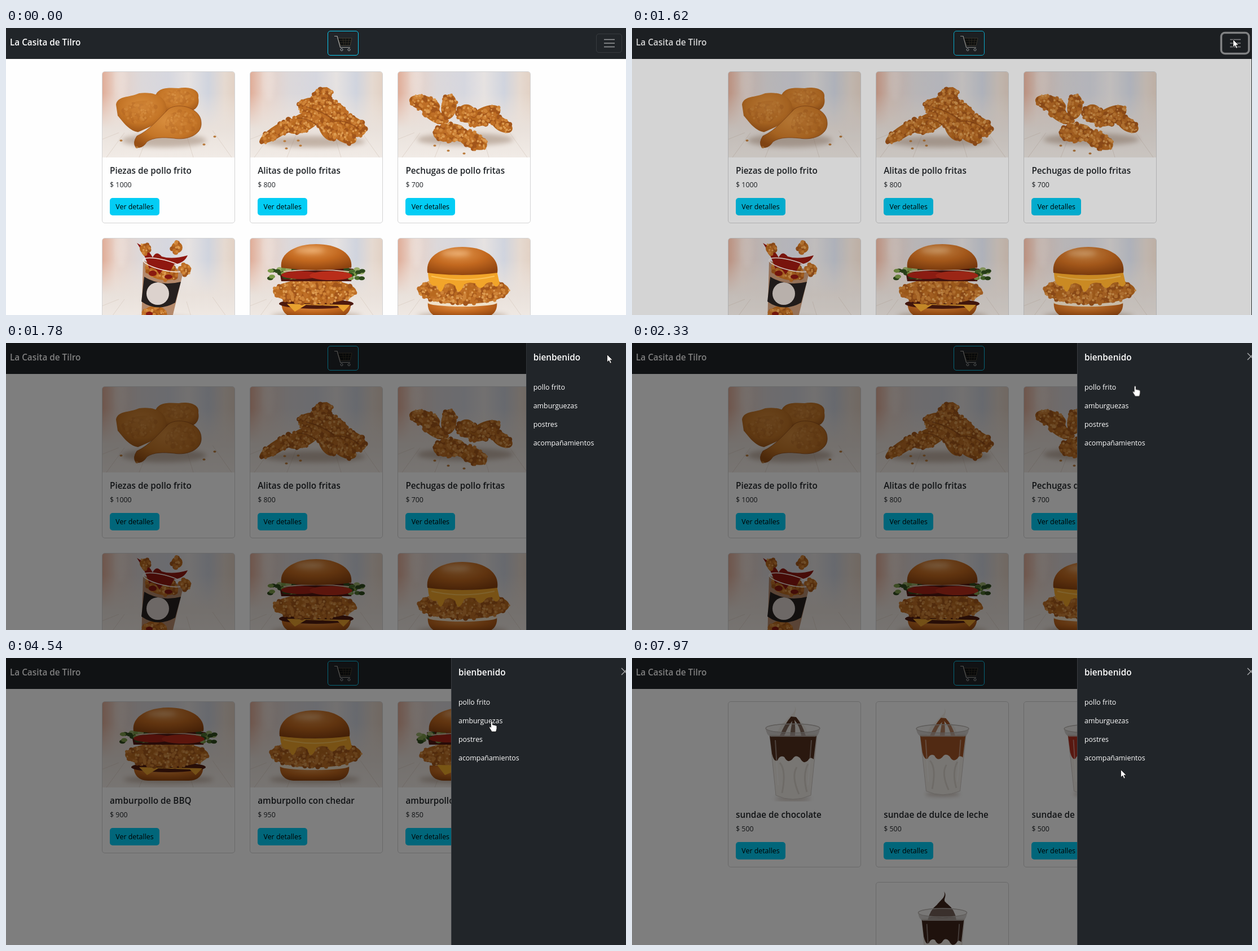
Write an HTML page that moves like this. It is 1099 by 510 pixels and loops after 8 s.

```html
<!DOCTYPE html>
<html lang="es">
<head>
<meta charset="utf-8">
<title>La Casita de Tilro</title>
<style>
html, body { margin: 0; width: 100%; height: 100%; overflow: hidden; background: #fefefe; }
body { position: relative; font: 12.4px/20px "Open Sans", "Noto Sans", sans-serif; color: #212529; }
body * { box-sizing: border-box; }
div, svg, span { position: absolute; white-space: nowrap; }
.layer { inset: 0; }

.nav { left: 0; top: 0; width: 100%; height: 55px; background: #212529; }
.h { font-size: 15.3px; font-weight: 600; }
.nav .h { left: 7px; top: 15px; color: #fff; }
.cart { left: 570px; top: 5px; width: 55px; height: 44px; border: 1px solid #0dcaf0; border-radius: 5px; }
.burger { left: 1046px; top: 10px; width: 46px; height: 34px; border: 1px solid rgba(255,255,255,.1); border-radius: 5px; }
.ring { inset: -1px; border-radius: 5px; box-shadow: 0 0 0 3.3px rgba(255,255,255,.55); }

.card { width: 236px; height: 270px; border: 1px solid #d3d3d4; border-radius: 5px; background: #fefefe; overflow: hidden; }
.card svg { left: 0; top: 0; width: 234px; height: 152px; }
.card .info { left: 13px; top: 152px; }
.info .h { top: 13px; }
.info .price { top: 39px; }
.info .btn { top: 72px; width: 88px; height: 31px; line-height: 31px; text-align: center; background: #03cdf5; border-radius: 5px; color: #000; }
.tall { height: 294.6px; }
.tall svg { height: 177px; }
.tall .info { top: 176.6px; }

.dim { inset: 0; background: #000; }
.panel { left: 789px; top: 0; width: 328px; height: 100%; background: #212529; border-left: 1px solid #3a3e42; color: #fff; }
.panel span { left: 12px; }
.cur { left: 0; top: 0; width: 0; height: 0; }
.cur svg { overflow: visible; width: 1px; height: 1px; left: 0; top: 0; }
.click { left: -10px; top: -10px; width: 20px; height: 20px; border-radius: 50%; background: rgba(255,255,0,.47); }

.rows1, .rowA, .rowB, .rows2, .rows3, .ring, .cur, .hand, .arrow, .click { animation: 8s step-end infinite; }
.rows1 { animation-name: rows1; }
.rowA { animation-name: rowA; }
.rowB { animation-name: rowB; }
.rows2 { animation-name: rows2; }
.rows3 { animation-name: rows3; }
.ring { animation-name: ring; }
.hand { animation-name: hand; }
.arrow { animation-name: arrow; }
.click { animation-name: click; }
.cur { animation: cur 8s linear infinite; }
.dim { animation: dim 8s linear infinite; }
.panel { animation: panel 8s linear infinite; }

@keyframes rows1 { 0% { visibility: visible } 56.7%, to { visibility: hidden } }
@keyframes rowA { 0% { visibility: visible } 39.95%, to { visibility: hidden } }
@keyframes rowB { 0% { visibility: hidden } 39.95% { visibility: visible } 56.7%, to { visibility: hidden } }
@keyframes rows2 { 0% { visibility: hidden } 56.7% { visibility: visible } 92.7%, to { visibility: hidden } }
@keyframes rows3 { 0% { visibility: hidden } 92.7%, to { visibility: visible } }
@keyframes ring { 0% { visibility: hidden } 18.75%, to { visibility: visible } }
@keyframes hand {
  0% { visibility: hidden } 13.5% { visibility: visible } 19.4% { visibility: hidden }
  27.7% { visibility: visible } 97.6%, to { visibility: hidden }
}
@keyframes arrow {
  0% { visibility: hidden } 3.25% { visibility: visible } 13.5% { visibility: hidden }
  19.4% { visibility: visible } 27.7% { visibility: hidden } 97.6%, to { visibility: visible }
}
@keyframes click {
  0% { visibility: hidden }
  18.75% { visibility: visible } 19.6% { visibility: hidden }
  35.875% { visibility: visible } 37.5% { visibility: hidden }
  51.75% { visibility: visible } 53.5% { visibility: hidden }
  88.625% { visibility: visible } 90.25%, to { visibility: hidden }
}
@keyframes cur {
  0%, 3.25% { transform: translate(1050px, 471px); animation-timing-function: cubic-bezier(.3,.3,.5,1) }
  12.6%, 24% { transform: translate(1065px, 20px); animation-timing-function: cubic-bezier(.4,.2,.7,.9) }
  28.25% { transform: translate(905px, 74px); animation-timing-function: ease-out }
  33.4%, 41.8% { transform: translate(855.5px, 80.5px) }
  46.75% { transform: translate(862px, 110.5px) }
  48.5%, 57% { transform: translate(861px, 112px) }
  57.6%, 59.4% { transform: translate(862px, 112px) }
  61.5% { transform: translate(864px, 116px) }
  69.4%, 73% { transform: translate(832px, 145px) }
  73.6%, 94.4% { transform: translate(830.5px, 146px) }
  97.9%, 99.4% { transform: translate(866px, 197px) }
  99.6%, to { transform: translate(866px, 198px) }
}
@keyframes dim { 0%, 19.28% { opacity: 0 } 22.25%, to { opacity: .5 } }
@keyframes panel {
  0%, 19.4% { transform: translateX(328px); animation-timing-function: ease-in-out }
  24.55%, to { transform: none }
}
</style>
</head>
<body>
<svg width="0" height="0">
  <defs id="art">
    <linearGradient id="wall">
      <stop offset="0" stop-color="#dfab96"/><stop offset=".1" stop-color="#e8d0c5"/>
      <stop offset=".3" stop-color="#dcd8da"/><stop offset=".5" stop-color="#d6d7df"/>
      <stop offset=".65" stop-color="#e6e2e1"/><stop offset=".8" stop-color="#d0d4de"/>
      <stop offset=".92" stop-color="#e5d9d0"/><stop offset="1" stop-color="#e2d1c4"/>
    </linearGradient>
    <linearGradient id="table" x2="0" y2="1">
      <stop offset=".25" stop-color="#efe6df" stop-opacity="0"/>
      <stop offset=".66" stop-color="#e9e1db"/><stop offset="1" stop-color="#f1ebe6"/>
    </linearGradient>
    <radialGradient id="bun" cx=".45" cy=".25" r=".8">
      <stop offset="0" stop-color="#e0934a"/><stop offset=".5" stop-color="#c2681f"/><stop offset="1" stop-color="#8c420f"/>
    </radialGradient>
    <radialGradient id="fried" cx=".5" cy=".35" r=".7">
      <stop offset="0" stop-color="#d98f3f"/><stop offset=".6" stop-color="#c47527"/><stop offset="1" stop-color="#985015"/>
    </radialGradient>
    <filter id="soft" x="-30%" y="-80%" width="160%" height="260%"><feGaussianBlur stdDeviation="4"/></filter>
  </defs>
</svg>

<div class="layer" id="page"></div>
<div class="nav">
  <span class="h">La Casita de Tilro</span>
  <div class="cart">
    <svg width="52" height="42" fill="none">
      <path d="M17 12h25l-3 13H22z" fill="#0d0f10" stroke="#4a4438"/>
      <path d="M20 16h21M21 20h19M26 12l2 13M31 12v13M37 12l-2 13" stroke="#3a3529" stroke-width=".8"/>
      <path d="M11 8.500h5l5.500 20H39" stroke="#a5a5a2" stroke-width="1.200"/>
      <g fill="#181a1b" stroke="#aeb4b8"><circle cx="24" cy="32.500" r="2"/><circle cx="37" cy="32.500" r="2"/></g>
    </svg>
  </div>
  <div class="burger">
    <div class="ring"></div>
    <svg width="44" height="32"><path d="M13 9.500h19M13 16h19M13 22.500h19" stroke="#9b9d9f" stroke-width="1.600"/></svg>
  </div>
</div>
<div class="dim"></div>
<div class="panel">
  <span class="h" style="top:15px">bienbenido</span>
  <span style="top:69px">pollo frito</span>
  <span style="top:102px">amburguezas</span>
  <span style="top:135px">postres</span>
  <span style="top:168px">acompañamientos</span>
  <svg style="left:300px;top:17px" width="14" height="14"><path d="M1 1l12 12M13 1L1 13" stroke="#a3a5a7" stroke-width="1.500"/></svg>
</div>
<div class="cur">
  <div class="click"></div>
  <svg class="arrow"><path d="M.5.5v13.500l3.200-2.900 2.300 5.100 2.300-1-2.300-5h4.200z" fill="#fff" stroke="#111" stroke-width=".8"/></svg>
  <svg class="hand"><path d="M-1.500 1.500q1.500-2 3 0v5.500q1.500-1 2.500.4 1.500-.8 2.500.6 2-.6 2.500 1.200v4.300q-.5 2.500-1.500 5.500h-7.500q-1.200-2.700-3.700-6.200-1.200-2.300.4-2.700 1-.1 1.800 1.300z" fill="#fff" stroke="#111" stroke-width=".8"/></svg>
</div>

<script>
let seed = 7;
const rnd = () => (seed = seed * 16807 % 2147483647) / 2147483647;
const $ = id => document.getElementById(id);
const tones = ['#a3561b', '#bf6f27', '#cf8438', '#dd9c52'];

// Crunchy coating: dark large lumps first, small light ones on top
function crisp(cx, cy, rx, ry, rot = 0) {
  const n = rx * ry / 8;
  let s = `<g transform="translate(${cx} ${cy}) rotate(${rot})"><ellipse rx="${rx * .9}" ry="${ry * .9}" fill="#b8691f"/>`;
  for (let i = 0; i < n; i++) {
    const k = i / n, a = rnd() * 6.283, d = Math.sqrt(rnd()) * .9;
    const x = Math.cos(a) * d * rx, y = Math.sin(a) * d * ry;
    s += `<circle cx="${x.toFixed(1)}" cy="${y.toFixed(1)}" r="${(.9 + (1 - k) * 3.2 + rnd()).toFixed(1)}" fill="${tones[k * 4 | 0]}"/>`;
  }
  return s + '</g>';
}
const path = (d, fill, more = '') => `<path d="${d}" fill="${fill}" ${more}/>`;
const oval = (x, y, rx, ry, fill, more = '') => `<ellipse cx="${x}" cy="${y}" rx="${rx}" ry="${ry}" fill="${fill}" ${more}/>`;
const shadow = (x, y, rx, ry) => oval(x, y, rx, ry, '#8f7460', 'opacity=".45" filter="url(#soft)"');
const crumb = (x, y) => oval(x, y, 2.6, 1.8, '#b87838');

const scene = '<rect width="236" height="152" fill="url(#wall)"/>' +
  oval(34, 16, 10, 36, '#f2e9e4', 'opacity=".4" filter="url(#soft)"') +
  '<rect width="236" height="152" fill="url(#table)"/>' +
  '<path d="M40 108L8 152M82 112L66 152M150 112l12 40M196 104l34 48M0 120l30-12" stroke="#d8cbc1" opacity=".7" fill="none"/>';

const pieces = shadow(110, 122, 75, 12) +
  path('M95 42C100 27 120 28 136 29C152 26 174 30 171 46C174 62 164 70 150 72L104 74Z', 'url(#fried)') +
  path('M25 58C28 42 48 46 66 38C90 34 116 44 114 66C110 90 84 98 64 107C46 104 36 86 28 78Z', 'url(#fried)') +
  path('M118 66C138 52 176 66 176 90C178 112 150 122 128 118C108 116 92 116 80 124Q72 137 60 134Q54 126 62 114C84 104 100 84 118 66Z', 'url(#fried)', 'stroke="#8d4a18" stroke-width=".8"') +
  '<g opacity=".3">' + crisp(66, 70, 34, 20, -15) + crisp(140, 90, 30, 22) + crisp(136, 46, 30, 13) + '</g>' +
  crumb(34, 122) + crumb(62, 134) + crumb(181, 129) + crumb(200, 115);

const wings = shadow(115, 124, 90, 10) + crisp(128, 42, 21, 15, -25) + crisp(130, 68, 50, 24, 12) +
  crisp(95, 90, 36, 18, -25) + crisp(50, 105, 42, 12, -32) + crisp(178, 96, 33, 20, 20) +
  crisp(168, 114, 25, 13, 25) + crisp(138, 100, 16, 27, -28) +
  path('M100 62q30 8 50 24M84 82q26 0 44 22M150 88q22-4 44 14', 'none', 'stroke="#8f4714" stroke-width="2" opacity=".7"') +
  crumb(62, 123) + crumb(65, 136) + crumb(86, 122) + crumb(90, 131);

const strips = shadow(120, 120, 85, 11) + crisp(48, 56, 31, 15, 15) + crisp(66, 78, 28, 12, 30) +
  crisp(91, 62, 15, 25, 8) + crisp(122, 74, 18, 18) + crisp(154, 78, 34, 17, -25) +
  crisp(185, 94, 23, 13, 30) + crisp(92, 108, 32, 18, -5) + crisp(132, 121, 32, 16, 25) +
  crumb(90, 140) + crumb(118, 145) + crumb(66, 131);

const loaf = (x, y, h) =>
  path(`M${x - 62} ${y + h}C${x - 66} ${y + 16} ${x - 36} ${y} ${x} ${y}S${x + 66} ${y + 16} ${x + 62} ${y + h}Q${x} ${y + h + 8} ${x - 62} ${y + h}Z`, 'url(#bun)') +
  oval(x - 12, y + 11, 26, 5, '#f3c595', 'opacity=".55" filter="url(#soft)"');
const base = x => shadow(x, 138, 80, 7) +
  path(`M${x - 61} 113H${x + 61}C${x + 63} 128 ${x + 54} 140 ${x + 36} 140H${x - 36}C${x - 54} 140 ${x - 63} 128 ${x - 61} 113Z`, 'url(#bun)');

function leaves(x) {
  let s = '';
  for (let i = 0; i < 44; i++) {
    const side = i % 2 ? 1 : -1, d = 36 + rnd() * 46;
    s += oval((x + side * d).toFixed(1), (54 + rnd() * 17).toFixed(1), 5.5, 3.5, ['#4c6e2c', '#7b9a48', '#2f4a1c', '#9aad6a'][rnd() * 4 | 0]);
  }
  return s;
}
const salad = x => path(`M${x - 66} 54Q${x} 44 ${x + 66} 54L${x + 62} 76H${x - 62}Z`, '#4f1710') + leaves(x) +
  oval(x - 28, 65, 34, 7, '#a62216') + oval(x + 26, 66, 38, 8, '#b92d1a') +
  path(`M${x - 58} 59Q${x} 52 ${x + 58} 59`, 'none', 'stroke="#d9b9a8" stroke-width="2"');
const bbq = base(118) + oval(118, 116, 66, 9, '#4e1a0e') + path('M66 116l14 14 20-12 56 2 10 10 12-12z', '#e9a22f') +
  crisp(115, 94, 82, 24) + salad(118) + loaf(118, 10, 42);
const classic = base(118) + crisp(115, 94, 82, 24) + path('M70 112l14 18 34-14 30 12 20-14z', '#f2ac28') + salad(118) + loaf(118, 10, 42);
const cheddar = base(115) + oval(115, 114, 62, 7, '#efe0c8') + crisp(117, 92, 90, 27) +
  path('M54 58Q115 72 176 58L181 80Q174 92 168 78Q158 76 152 86Q144 92 138 80Q126 76 118 82Q108 106 102 84Q92 76 84 82Q76 106 70 84Q54 88 54 58Z', '#f2a52a') +
  path('M60 67Q115 80 172 67', 'none', 'stroke="#fcc35a" stroke-width="2"') + loaf(115, 15, 46);

const snack = shadow(112, 146, 50, 7) +
  path('M73 40L145 56L122 152H70Z', '#a8744f', 'opacity=".8"') +
  crisp(106, 58, 33, 17, 12) + crisp(94, 136, 24, 18) +
  path('M62 8Q84 20 90 34Q96 20 106 32Q124 38 152 30Q146 44 128 46L120 60Q110 50 102 64Q92 46 84 54Q78 32 62 8Z', '#8f1810') +
  oval(90, 62, 7, 5, '#8a1a10') + oval(118, 68, 7, 4, '#861811') + oval(84, 134, 6, 4, '#8a1a10') + oval(106, 142, 7, 4, '#8a1a10') +
  '<ellipse cx="109" cy="47" rx="37" ry="9" transform="rotate(14 109 47)" fill="none" stroke="#f3ebe6" stroke-width="1.500"/>' +
  path('M75 68Q104 86 140 77L130 114Q98 132 70 112Z', '#26201f') +
  '<circle cx="99" cy="98" r="20" fill="#dcd2cd"/>' +
  crisp(133, 16, 11, 11) + crisp(76, 18, 10, 10) + crisp(148, 55, 11, 11);

function sundae(sauce, move, cover) {
  const swirl = 'M118 7C126 18 112 22 124 30Q140 42 142 60H86Q90 42 104 32C112 22 122 18 118 7Z';
  return `<g transform="${move}">` + shadow(115, 172, 32, 4) +
    path('M74 58H158L147 166Q115 180 85 166Z', '#f1ede8', 'stroke="#cfc9c4"') +
    path('M74 60H157L152 102Q146 96 142 104Q134 112 128 100Q120 92 114 102Q106 110 100 98Q92 94 88 104Q82 108 78 92Z', sauce) +
    path('M92 108Q104 122 96 162M122 116Q112 132 126 164M142 110Q132 130 140 160', 'none', 'stroke="#ddd7d0" stroke-width="3"') +
    path(swirl, cover ? sauce : '#f4f0ea') +
    path('M112 26Q100 40 92 60H100Q106 44 114 34Q112 46 110 60H119Q120 44 118 32Q128 44 130 60H138Q132 40 121 27Z', sauce) +
    oval(115, 47, 48, 8, '#d6d0cb', 'opacity=".35"') +
    '<ellipse cx="115" cy="47" rx="48" ry="8" fill="none" stroke="#bcb7b3" stroke-width="1.500"/>' +
    path('M67 47Q68 59 76 62H155Q162 59 163 47Q150 56 115 56T67 47Z', '#c9c3bf', 'opacity=".75"') +
    path('M84 68l5 80M148 68l-6 80', 'none', 'stroke="#fff" stroke-width="2" opacity=".4"') + '</g>';
}

const symbol = (id, h, body) => `<symbol id="${id}" viewBox="1 0 234 ${h}">${body}</symbol>`;
$('art').innerHTML += Object.entries({ pieces, wings, strips, snack, bbq, cheddar, classic })
  .map(([id, body]) => symbol(id, 152, scene + body)).join('') +
  symbol('choco', 177, sundae('#54301f', '')) +
  symbol('dulce', 177, sundae('#a35427', 'translate(7 4) scale(.97 .93)')) +
  symbol('berry', 177, sundae('#b23120', 'translate(7 4) scale(.97 .93)')) +
  symbol('dark', 177, sundae('#3f241a', 'translate(15 9) scale(.9 .95)', true));

const card = (col, top, art, name, price, cls = '') =>
  `<div class="card ${cls}" style="left:${170 + col * 262.2}px;top:${top}px"><svg><use href="#${art}"/></svg>
  <div class="info"><span class="h">${name}</span><span class="price">$ ${price}</span><span class="btn">Ver detalles</span></div></div>`;
const group = (cls, ...cards) => `<div class="layer ${cls}">${cards.join('')}</div>`;
const burgers = [['bbq', 'amburpollo de BBQ', 900], ['cheddar', 'amburpollo con chedar', 950], ['classic', 'amburpollo clasica', 850]];
const pop = ['snack', 'Bocaditos de pollo', 600];

$('page').innerHTML =
  group('rows1',
    card(0, 77, 'pieces', 'Piezas de pollo frito', 1000),
    card(1, 77, 'wings', 'Alitas de pollo fritas', 800),
    card(2, 77, 'strips', 'Pechugas de pollo fritas', 700)) +
  group('rowA', card(0, 373, ...pop), card(1, 373, ...burgers[0]), card(2, 373, ...burgers[1])) +
  group('rowB', card(1, 373, ...pop)) +
  group('rows2', ...burgers.map((b, i) => card(i, 77, ...b))) +
  group('rows3',
    card(0, 77, 'choco', 'sundae de chocolate', 500, 'tall'),
    card(1, 77, 'dulce', 'sundae de dulce de leche', 500, 'tall'),
    card(2, 77, 'berry', 'sundae de frutilla', 500, 'tall'),
    card(1, 398, 'dark', 'sundae de cacao', 500, 'tall'));
</script>
</body>
</html>
```
